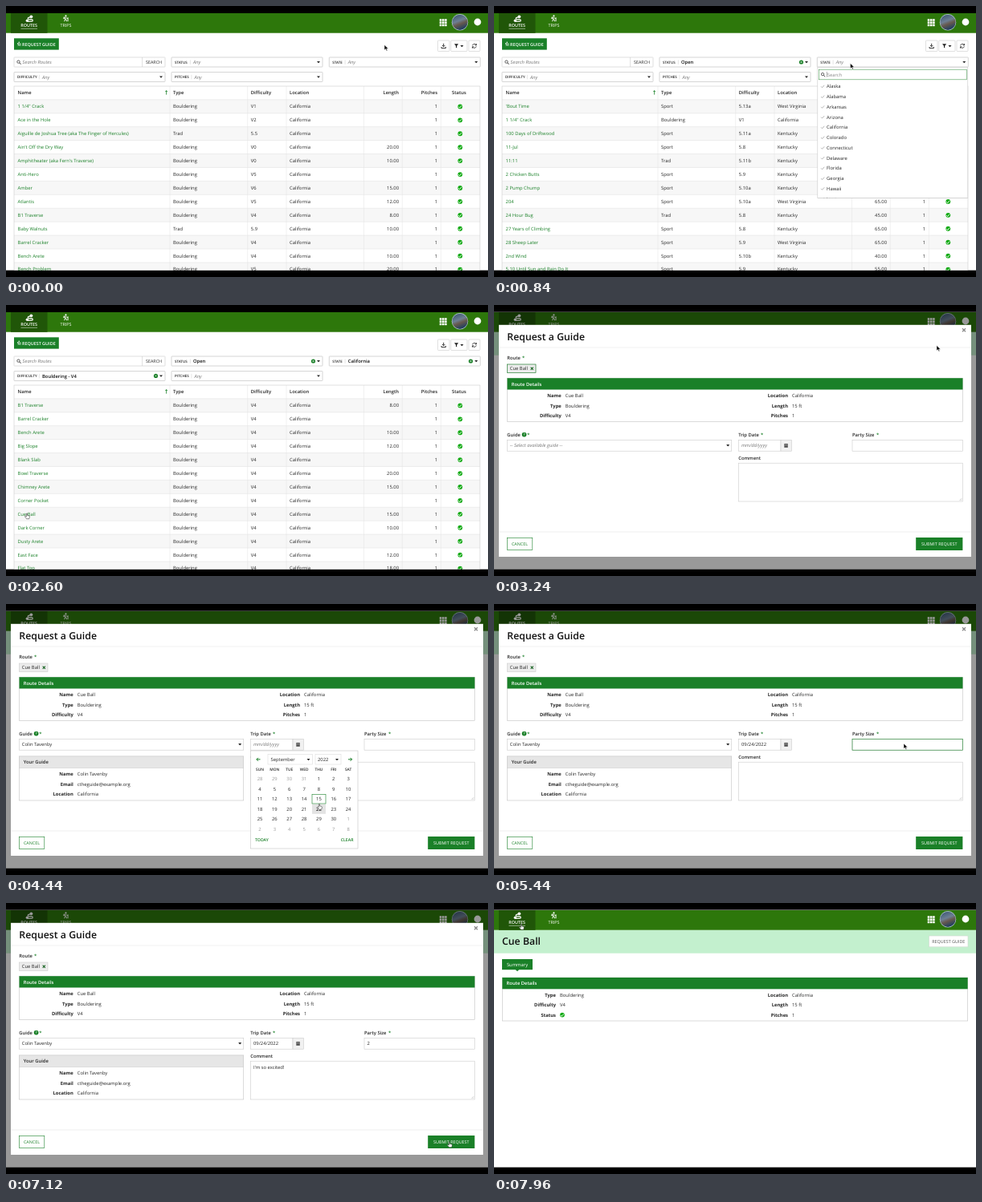
Write an HTML page that moves like this. It is 600 px wide and 338 px high and loops after 8 s.

```html
<!DOCTYPE html>
<html lang="en">
<head>
<meta charset="utf-8">
<title>Request a guide</title>
<style>
html, body { margin: 0; width: 100%; height: 100%; overflow: hidden; background: #000; }
svg { display: block; width: 100vw; height: 100vh; }
text { font-family: "Open Sans", "Noto Sans", sans-serif; text-rendering: geometricPrecision; white-space: pre; }
</style>
</head>
<body>
<svg id="stage" viewBox="0 0 600 338"></svg>
<script>
const LOOP = 8000;
const TOP = 9, NAV_END = 33.7, BOTTOM = 329.8;
const GREEN = '#1a8028', INK = '#262626', GRAY = '#777', LINE = '#ccc';
const GUIDE = 'Colin Tavenby', MAIL = 'ctheguide@example.org', NOTE = "I'm so excited!";

// Moments at which the page reacts, in ms.
const AT = { open: 520, openList: 600, state: 1200, stateList: 1320, grade: 1800, gradeList: 2040, route: 2680,
  modal: 3120, guide: 3900, calendar: 4220, date: 5100, party: 5420, size: 5540, comment: 5700, typing: 5760, blur: 6380, sent: 7140 };

// Drawing helpers; text is placed by its vertical centre.
const text = (x, y, str, { s = 5.85, w = 400, f = INK, a = 'start', i = 0, id = '' } = {}) =>
  `<text x="${x}" y="${y + s * .355}" font-size="${s}" font-weight="${w}" fill="${f}" text-anchor="${a}"` +
  `${i ? ' font-style="italic"' : ''}${id ? ` id="${id}"` : ''}>${str}</text>`;
const bold = (x, y, str, o) => text(x, y, str, { w: 600, ...o });
const box = (x, y, x2, y2, fill, stroke = 'none', r = 0) =>
  `<rect x="${x}" y="${y}" width="${x2 - x}" height="${y2 - y}" rx="${r}" fill="${fill}" stroke="${stroke}" stroke-width=".6"/>`;
const path = (d, stroke, w = .7, fill = 'none') =>
  `<path d="${d}" fill="${fill}" stroke="${stroke}" stroke-width="${w}"/>`;
const dot = (x, y, r, fill) => `<circle cx="${x}" cy="${y}" r="${r}" fill="${fill}"/>`;
const hline = (x, x2, y, c = LINE) => path(`M${x} ${y}H${x2}`, c, .5);
const caret = (x, y) => path(`M${x - 2} ${y - 1.1}h4l-2 2.4z`, 'none', 0, '#222');
const tick = (x, y, c, w = .8) => path(`M${x - 2} ${y}l1.4 1.5 2.7 -3`, c, w);
const cross = (x, y, r, c, w) => path(`M${x - r} ${y - r}l${2 * r} ${2 * r}m0 ${-2 * r}l${-2 * r} ${2 * r}`, c, w);
const okMark = (x, y) => dot(x, y, 2.9, '#12aa14') + tick(x - .1, y + .2, '#fff', .9);
const lens = (x, y, c = '#333') => `<circle cx="${x}" cy="${y}" r="1.7" fill="none" stroke="${c}" stroke-width=".8"/>` +
  path(`M${x + 1.2} ${y + 1.2}l1.9 1.9`, c, 1);
const hiker = (x, y, k) => `<g transform="translate(${x} ${y}) scale(${k})">${dot(.3, -3.6, 1.1, '#fff')}` +
  path('M0-2.2l-.6 2.6 1.5 1 .5 2.2M-.5.6l-1.1 3M.4-1.6l1.2 1.2h1.4M3-1.6v5.2', '#fff', 1) +
  path('M-1.8-2.2l-.6 2.6', '#fff', 1.4) + '</g>';
const during = (from, to, ...parts) => `<g data-from="${from}" data-to="${to}">${parts.join('')}</g>`;

function navBar() {
  let squares = '';
  for (let k = 0; k < 9; k++) {
    const x = 539.7 + k % 3 * 3.2, y = 16.2 + Math.floor(k / 3) * 3.2;
    squares += box(x, y, x + 2.6, y + 2.6, '#fff');
  }
  return box(0, TOP, 600, NAV_END, '#2d770b') + box(6, TOP, 51.5, NAV_END, '#205608') +
    path('M27 19.2h4.6q1.7 0 1.7-1.3t-1.7-1.3h-2.6q-1.8 0-1.8-1.2t2.2-1.2h1', '#fff', 1.2) +
    dot(31.4, 13.3, 1.9, '#fff') + dot(26.4, 18.3, 1.7, '#fff') +
    bold(28.7, 24.3, 'ROUTES', { s: 5.4, f: '#fff', a: 'middle' }) + hline(18.5, 39, 28.3, '#fff') +
    hiker(74.2, 15.8, .95) + text(74.5, 24.3, 'TRIPS', { s: 5.4, f: '#fff', a: 'middle' }) + squares +
    dot(565, 20.3, 10.2, '#b9c9d8') + dot(565, 20.3, 9.6, 'url(#avatar)') + dot(587, 20, 4.4, '#fff');
}

function field(x, y, label, gap) {
  return box(x, y, x + 188, y + 12, '#fff', '#bbb', .6) +
    bold(x + 4, y + 6.2, label, { s: 4.5 }) + path(`M${x + gap - 3.6} ${y + 3.4}v5.4`, '#bbb', .4) + caret(x + 183, y + 6);
}
// Field value that turns from "Any" into a choice at a given time.
function choice(x, y, value, at) {
  const any = text(x, y, 'Any', { f: GRAY, i: 1 });
  if (!value) return any;
  const right = y > 80 ? 186.5 : x < 300 ? 382.5 : 578.5;
  return during(0, at, any) + during(at, LOOP, bold(x, y, value, { f: '#111' }),
    dot(right, y - .2, 2.6, GREEN), cross(right, y - .2, .9, '#fff', .7));
}

function dropdown(x, y, bottom, items, picked) {
  let out = box(x, y, x + 187, bottom, '#fff', '#c8c8c8') +
    box(x + 1.5, y + 2.7, x + 185.5, y + 15.3, '#fff', '#4a9c54') + lens(x + 6.3, y + 8.6, '#444') +
    text(x + 12, y + 9, 'Search', { f: '#888' }) + path(`M${x + 11.6} ${y + 5.4}v6.8`, '#333', .4);
  items.forEach((name, k) => {
    const cy = y + 23.8 + k * 12.75;
    const row = (hot) => (hot ? box(x, cy - 6.3, x + 187, cy + 6.3, GREEN) : '') +
      tick(x + 6.3, cy, hot ? '#fff' : '#999', hot ? 1 : .7) + text(x + 11.3, cy, name, { f: hot ? '#fff' : INK });
    out += name === picked ? during(0, AT.grade, row(false)) + during(AT.grade, LOOP, row(true)) : row(false);
  });
  const clip = `clip${x}-${y}`;
  return `<clipPath id="${clip}">${box(x - 1, y - 1, x + 188, bottom + .4, '#000')}</clipPath><g clip-path="url(#${clip})">${out}</g>` +
    hline(x, x + 187, bottom, '#c8c8c8');
}

const PLACES = { C: 'California', K: 'Kentucky', W: 'West Virginia' };
const KINDS = { B: 'Bouldering', S: 'Sport', T: 'Trad' };
// Each route: name | kind | grade | place | length
const calRoutes = `1 1/4" Crack|B|V1|C|
Ace in the Hole|B|V2|C|
Aiguille de Joshua Tree (aka The Finger of Hercules)|T|5.5|C|
Ain't Off the Dry Way|B|V0|C|20
Amphitheater (aka Fern's Traverse)|B|V0|C|10
Anti-Hero|B|V5|C|
Amber|B|V6|C|15
Atlantis|B|V5|C|12
B1 Traverse|B|V4|C|8
Baby Walnuts|T|5.9|C|10
Barrel Cracker|B|V4|C|
Bench Arete|B|V4|C|10
Bench Problem|B|V5|C|20`;
const openRoutes = `'Bout Time|S|5.13a|W|60
1 1/4" Crack|B|V1|C|
100 Days of Driftwood|S|5.11a|K|60
11-Jul|S|5.8|K|50
11:11|T|5.11b|K|60
2 Chicken Butts|S|5.9|K|45
2 Pump Chump|S|5.10a|K|50
204|S|5.10a|W|65
24 Hour Bug|T|5.8|K|45
27 Years of Climbing|S|5.8|K|65
28 Sheep Later|S|5.9|W|65
2nd Wind|S|5.10b|K|40
5.10 Until Sun and Rain Do It|S|5.9|K|55`;
const v4Routes = `B1 Traverse|B|V4|C|8
Barrel Cracker|B|V4|C|
Bench Arete|B|V4|C|10
Big Slope|B|V4|C|12
Blank Slab|B|V4|C|
Bowl Traverse|B|V4|C|20
Chimney Arete|B|V4|C|15
Corner Pocket|B|V4|C|
Cue Ball|B|V4|C|15
Dark Corner|B|V4|C|10
Dusty Arete|B|V4|C|
East Face|B|V4|C|12
Flat Top|B|V4|C|18`;

function rows(list) {
  return list.split('\n').map((line, k) => {
    const [name, kind, grade, place, len] = line.split('|');
    const y = 125.2 + k * 16.93;
    return text(14.6, y, name, { f: GREEN }) + text(208, y, KINDS[kind]) + text(304.8, y, grade) +
      text(353, y, PLACES[place]) + (len ? text(489, y, len + '.00', { a: 'end' }) : '') +
      text(537, y, '1', { a: 'end' }) + okMark(565.3, y + .2);
  }).join('');
}

function listPage() {
  let grid = '';
  for (let k = 0; k < 13; k++) {
    const y = 116.8 + k * 16.93;
    if (k % 2 === 0) grid += box(10, y, 590, y + 16.93, '#f7f7f7');
    grid += hline(10, 590, y, '#ddd');
  }
  for (const x of [204, 300.7, 349, 445.5, 493.3, 541.4]) grid += path(`M${x} 100V330`, '#e2e2e2', .5);
  const heads = [[14.6, 'Name'], [208, 'Type'], [304.8, 'Difficulty'], [353, 'Location']].map(([x, s]) => bold(x, 108.3, s)).join('') +
    bold(489, 108.3, 'Length', { a: 'end' }) + bold(537, 108.3, 'Pitches', { a: 'end' }) + bold(564, 108.3, 'Status', { a: 'middle' });
  const tools = [[537.5, 552], [553.8, 574], [576, 590]].map(([a, b]) => box(a, 43, b, 56.5, '#fff', '#ccc', .8)).join('') +
    path('M544.7 46.8v3.6M543 49l1.7 1.8 1.7-1.8M542 51v1.6h5.4V51', '#222', .9) +
    path('M558 47.3h5.2l-2 2.5v2.8l-1.2-.9v-1.9z', 'none', 0, '#222') + caret(567.5, 50) +
    path('M580.6 49.3a2.5 2.5 0 0 1 4.6-.7M585.4 50.4a2.5 2.5 0 0 1-4.6.7M585.5 47v1.9h-1.9M580.5 52.7v-1.9h1.9', '#222', .8);
  const boulders = Array.from({ length: 12 }, (_, k) => 'Bouldering - V' + k);
  const states = ['Alaska', 'Alabama', 'Arkansas', 'Arizona', 'California', 'Colorado', 'Connecticut', 'Delaware', 'Florida', 'Georgia', 'Hawaii', 'Iowa'];
  return box(10, 40.3, 65.8, 54.6, GREEN) + hiker(16, 47.5, .65) +
    bold(20, 47.6, 'REQUEST GUIDE', { s: 5.4, f: '#fff' }) + tools +
    box(10, 64, 198, 76, '#fff', '#ccc', .6) + path('M169.6 64v12', '#ccc', .6) + lens(15.5, 69.6) +
    text(20.6, 70.2, 'Search Routes', { f: GRAY, i: 1 }) + text(184, 70.2, 'SEARCH', { s: 5.4, a: 'middle' }) +
    field(206, 64, 'STATUS', 27) + field(402.3, 64, 'STATE', 23.4) + field(10, 82.5, 'DIFFICULTY', 35) + field(206, 82.5, 'PITCHES', 28.5) +
    choice(233, 70.2, 'Open', AT.open) + choice(425.7, 70.2, 'California', AT.state) +
    choice(45, 88.6, 'Bouldering - V4', AT.grade) + choice(234.5, 88.6) +
    grid + box(10, 100, 590, 340, 'none', '#ccc') + heads + path('M199.6 110.6v-5M198.3 107l1.3-1.5 1.3 1.5', GREEN, .8) +
    during(0, AT.openList, rows(calRoutes)) + during(AT.openList, AT.stateList, rows(openRoutes)) +
    during(AT.stateList, AT.gradeList, rows(calRoutes)) + during(AT.gradeList, LOOP, rows(v4Routes)) +
    during(280, AT.open + 40, dropdown(206.5, 76, 120, ['Open', 'Closed'])) +
    during(800, AT.state + 40, dropdown(402.8, 76.5, 239.5, states)) +
    during(1560, 2000, dropdown(10.5, 95, 258, boulders, 'Bouldering - V4'));
}

// Rows of label/value pairs in two columns.
const pairs = (y, left, right, list) => list.map(([a, b, c, d], k) => {
  const cy = y + k * 12.35, label = { a: 'end', w: 700 };
  return bold(left, cy, a, label) + (b ? text(left + 5, cy, b) : okMark(left + 8, cy)) +
    (c ? bold(right, cy, c, label) + text(right + 5, cy, d) : '');
}).join('');
const panel = (x, y, x2, y2, title, dark = true) => box(x, y, x2, y2, '#fff', '#c4c4c4') +
  box(x, y, x2, y + 14.3, dark ? GREEN : '#e6e6e6', dark ? 'none' : '#ccc') +
  bold(x + 5.3, y + 7.3, title, { f: dark ? '#fff' : INK });

function routePage() {
  return box(0, TOP - 1, 600, TOP, '#666') + box(0, NAV_END, 600, 62.7, '#c3f0ce') + bold(10, 47.2, 'Cue Ball', { s: 12.3, f: '#111' }) +
    box(541.5, 41, 590, 54.8, '#fff', '#cfd8d0') + text(565.8, 48, 'REQUEST GUIDE', { s: 5.4, f: '#555', a: 'middle' }) +
    box(10, 70, 48, 83.2, GREEN) + path('M26.8 83l2.2 2.2 2.2-2.2z', 'none', 0, GREEN) +
    text(29, 76.6, 'Summary', { f: '#fff', a: 'middle' }) + panel(10.3, 93, 589.7, 147, 'Route Details') +
    pairs(114.9, 77, 366, [['Type', 'Bouldering', 'Location', 'California'], ['Difficulty', 'V4', 'Length', '15 ft'], ['Status', '', 'Pitches', '1']]);
}

function calendar() {
  let out = box(304.5, 183, 438, 305, '#fff', '#c4c4c4') + box(326, 187.5, 381.5, 200, '#fff', '#ddd') + box(385, 187.5, 417, 200, '#fff', '#ddd') +
    text(329.5, 194, 'September') + caret(376.5, 194) + text(388, 194, '2022') + caret(412, 194) +
    path('M316.5 193.8h-4.6m2-2l-2 2 2 2M426 193.8h4.6m-2-2l2 2-2 2', GREEN, 1) +
    during(4360, 4720, box(381, 249.8, 398, 261.8, '#e3e3e3')) + during(4840, LOOP, box(417.6, 249.8, 434.6, 261.8, '#e3e3e3')) +
    box(381, 237.3, 398, 249, '#fff', GREEN);
  ['SUN', 'MON', 'TUE', 'WED', 'THU', 'FRI', 'SAT'].forEach((d, k) => out += bold(316 + k * 18.35, 206.6, d, { s: 4.8, a: 'middle' }));
  for (let k = 0; k < 42; k++) {
    const day = k - 3, inside = day > 0 && day < 31;
    out += text(316 + k % 7 * 18.35, 218.4 + Math.floor(k / 7) * 12.5, day < 1 ? day + 31 : day > 30 ? day - 30 : day,
      { a: 'middle', f: inside ? INK : '#999', w: day === 22 ? 600 : 400 });
  }
  return out + bold(310, 294.6, 'TODAY', { s: 5.2, f: GREEN }) + bold(432.5, 294.6, 'CLEAR', { s: 5.2, f: GREEN, a: 'end' });
}

function modal() {
  const star = (x, y) => bold(x, y, '*', { f: GREEN });
  const input = (x, y, x2, y2) => box(x, y, x2, y2, '#fff', LINE);
  return box(0, TOP - 1, 600, BOTTOM, 'rgba(0,0,0,.4)') + box(6, 24.8, 594, 314, '#fff') +
    bold(16.3, 39.6, 'Request a Guide', { s: 12.3, f: '#111' }) + cross(585, 31.2, 2, '#888', 1.3) + hline(6, 594, 53, '#e2e2e2') +
    bold(16.3, 65.8, 'Route') + star(35, 65.8) + box(16.4, 74, 52, 84.4, '#ececec', '#ccc') +
    during(0, 3440, box(16.4, 74, 52, 84.4, 'none', GREEN)) + text(19.8, 79.2, 'Cue Ball') + cross(47.3, 79.2, 1.6, '#14601e', 1.1) +
    panel(16.5, 91.2, 583.5, 145.5, 'Route Details') +
    pairs(113.3, 83.8, 366, [['Name', 'Cue Ball', 'Location', 'California'], ['Type', 'Bouldering', 'Length', '15 ft'], ['Difficulty', 'V4', 'Pitches', '1']]) +
    bold(16.3, 161.6, 'Guide') + dot(37.6, 161.6, 2.9, GREEN) + bold(37.6, 161.7, '?', { s: 4.6, f: '#fff', a: 'middle' }) + star(41.3, 161.6) +
    input(16.5, 168.3, 295.7, 182.2) + caret(291.2, 175.2) +
    during(0, AT.guide, text(19.8, 175.3, '-- Select available guide --', { f: GRAY, i: 1 })) +
    during(AT.guide, LOOP, text(19.8, 175.3, GUIDE), panel(16.5, 190, 295.7, 245, 'Your Guide', false),
      pairs(212.2, 83.8, 0, [['Name', GUIDE], ['Email', MAIL], ['Location', 'California']])) +
    during(3640, AT.guide, box(16.5, 182.2, 295.7, 196, '#fff', '#c4c4c4'), text(19.8, 189, GUIDE)) +
    bold(304.2, 161.6, 'Trip Date') + star(332, 161.6) + input(304.3, 168.3, 357, 182.2) + box(357, 168.3, 370.3, 182.2, '#f1f1f1', LINE) +
    box(361.3, 173, 365.8, 177.8, '#555') + path('M361.8 174.6h3.6M362.5 172v1M364.6 172v1', '#ddd', .5) +
    during(0, AT.date, text(308, 175.3, 'mm/dd/yyyy', { f: GRAY, i: 1 })) + during(AT.date, LOOP, text(308, 175.3, '09/24/2022')) +
    bold(446, 161.6, 'Party Size') + star(476, 161.6) + input(446, 168.3, 583.4, 182.2) +
    during(AT.party, AT.comment, box(446, 168.3, 583.4, 182.2, 'none', GREEN)) + during(AT.size, LOOP, text(449.6, 175.3, '2')) +
    bold(304.2, 190.8, 'Comment') + input(304.3, 197.2, 583.4, 245) + path('M579.6 243.8l2.6-2.6M581.2 243.8l1-1', '#888', .4) +
    during(AT.comment, AT.blur, box(304.3, 197.2, 583.4, 245, 'none', GREEN)) + text(308, 204.6, '', { id: 'note' }) +
    hline(6, 594, 283, '#ddd') + box(16.3, 290.3, 47.8, 305.7, '#fff', GREEN) + text(32, 298.2, 'CANCEL', { s: 5.4, f: GREEN, a: 'middle', w: 500 }) +
    box(525.2, 290, 583.4, 306, GREEN) + bold(554.3, 298.2, 'SUBMIT REQUEST', { s: 5.4, f: '#fff', a: 'middle', w: 500 }) +
    during(AT.calendar, AT.date, calendar());
}

const arrow = path('M0 0v6.6l1.6-1.5 1.1 2.5 1.1-.5-1.1-2.4h2.2z', '#fff', .5, '#000');
const hand = path('M-.6 0q.7-.6 1.1 0v2.4l2.4.6q.7.3.5 1.1l-.6 2.6h-3.2l-2.2-2.8q.3-1 1.2-.4l.8.6z', '#222', .5, '#fff');

const stage = document.getElementById('stage');
stage.innerHTML = `<defs><linearGradient id="avatar" x2=".4" y2="1"><stop stop-color="#34506f"/><stop offset=".5" stop-color="#6d7f93"/>
  <stop offset=".7" stop-color="#67594e"/><stop offset="1" stop-color="#27415f"/></linearGradient></defs>` +
  box(0, TOP, 600, BOTTOM, '#fff') + during(0, AT.route, listPage()) + during(AT.route, LOOP, routePage()) + navBar() +
  during(AT.modal, AT.sent, modal()) + box(0, BOTTOM, 600, 338, '#000') +
  `<g id="cursor"><g id="arrow">${arrow}</g><g id="hand">${hand}</g></g>`;

// Pointer stops: time, x, y
const stops = [[0, 471, 48.5], [240, 300, 70], [300, 296, 72], [480, 242, 99], [540, 242, 99], [760, 442, 70], [840, 443.5, 71.5],
  [1120, 428, 150], [1220, 428, 150], [1520, 104, 88], [1580, 104, 88], [1760, 84, 168], [1820, 84, 166], [1880, 87.5, 150.5],
  [2520, 26, 260], [2680, 26, 260], [3000, 560, 47], [3140, 560, 47], [3240, 551, 50.5], [3580, 160, 174], [3680, 158, 176], [3840, 60, 188],
  [3920, 60, 188], [4180, 363, 174], [4260, 363, 176], [4440, 390, 249.5], [4640, 390, 250], [4920, 426, 254], [5120, 426, 254],
  [5380, 510, 174], [5560, 510, 174], [5680, 430, 212], [6200, 430, 212], [6480, 531, 325], [6900, 552, 298], [7180, 552, 298], [7900, 34, 26.5], [8000, 34, 26.5]];
const handTimes = [[2440, 2720], [2960, 3140], [4340, 5140], [6800, 7260], [7800, 8000]];

const timed = [...stage.querySelectorAll('[data-from]')].map(el => ({ el, from: +el.dataset.from, to: +el.dataset.to }));
const [cursor, arrowEl, handEl, note] = ['cursor', 'arrow', 'hand', 'note'].map(id => document.getElementById(id));
const show = (el, on) => el.style.display = on ? '' : 'none';

function draw(t) {
  for (const { el, from, to } of timed) show(el, t >= from && t < to);
  const k = stops.findIndex(s => s[0] > t);
  const [t0, x0, y0] = stops[k - 1], [t1, x1, y1] = stops[k];
  const p = (t - t0) / (t1 - t0), e = p * p * (3 - 2 * p);
  cursor.setAttribute('transform', `translate(${x0 + (x1 - x0) * e} ${y0 + (y1 - y0) * e})`);
  const pointing = handTimes.some(([a, b]) => t >= a && t < b);
  show(handEl, pointing);
  show(arrowEl, !pointing);
  note.textContent = NOTE.slice(0, Math.max(0, Math.floor((t - AT.typing) / 36)));
}

const start = performance.now();
function tickFrame(now) {
  draw(Math.max(0, now - start) % LOOP);
  requestAnimationFrame(tickFrame);
}
draw(0);
requestAnimationFrame(tickFrame);
</script>
</body>
</html>
```
